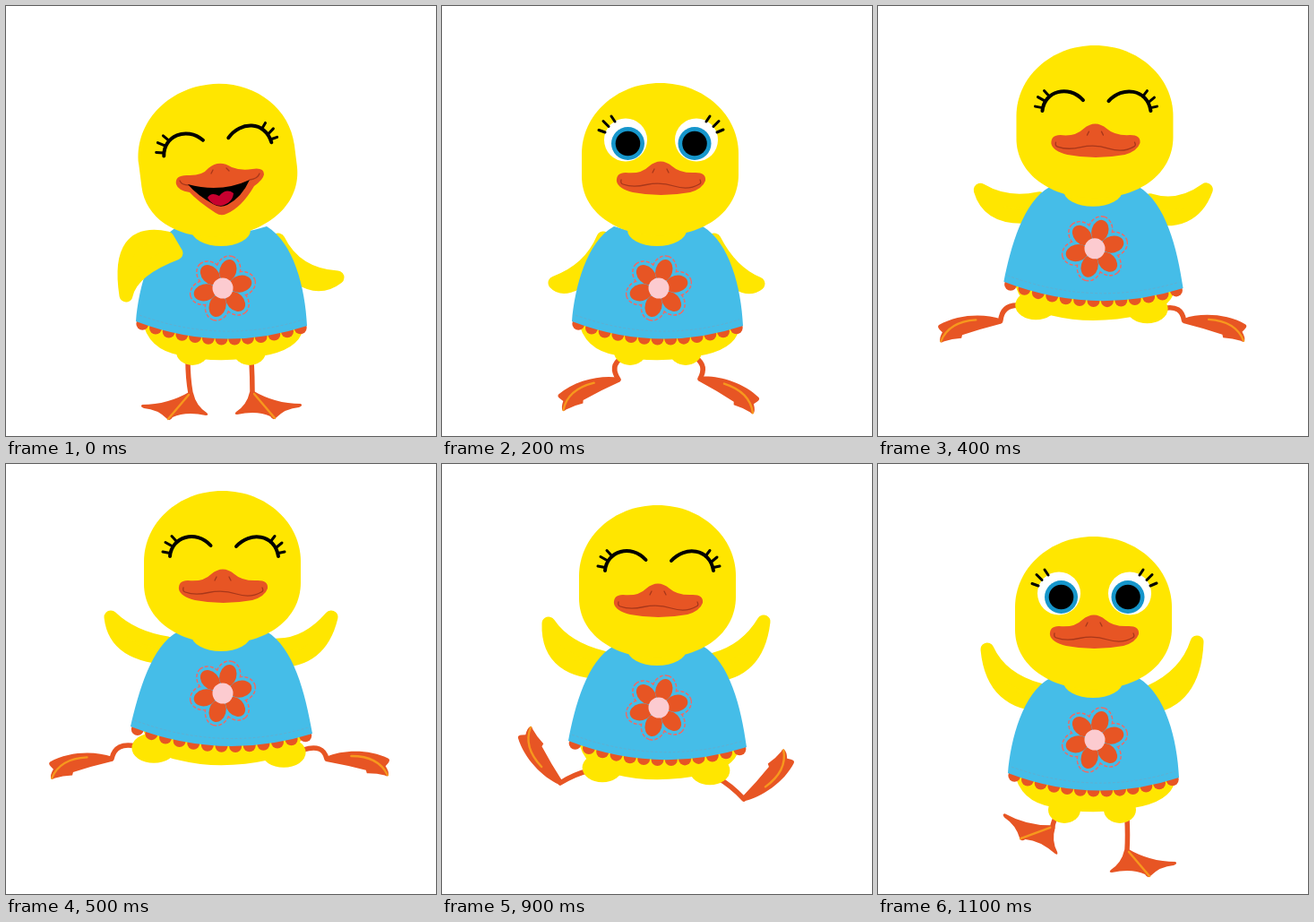
Animation of 480 by 480 pixels, one loop 1.2 s. Source, as an HTML page:

```html
<!DOCTYPE html>
<html lang="en">
<head>
<meta charset="utf-8">
<title>Jumping duckling</title>
<style>
  html, body { margin: 0; width: 100%; height: 100%; overflow: hidden; background: #fff; }
  svg { display: block; width: 100vw; height: 100vh; }
</style>
</head>
<body>
<svg id="stage" viewBox="0 0 480 480"></svg>
<script>
const YELLOW = '#ffe600', BLUE = '#45bde8', ORANGE = '#e75524', DARK = '#a8371a';
const STEP = 100, STEPS = 12;

// y: flower centre, head: [x, top, tilt], hem: extra dress width, thighs: [x, y] pairs,
// wings: upper control, tip, lower control, legs: hip, control, ankle, foot angle
const stand = {
  y: 315, hem: 0, head: [235.7, 87, -7.2], thighs: [208, 386, 272, 386],
  wingL: [122, 247, 134, 323, 140, 295], wingR: [323, 300, 370, 303, 340, 326],
  legL: [203, 396, 203, 415, 206, 432, 0], legR: [274, 396, 275, 415, 275, 431, 0],
  foot: 'web', face: 'laugh'
};
const crouch = {
  y: 315, hem: 0, head: [243.5, 86, 0], thighs: [210, 386, 272, 386],
  wingL: [165, 295, 126, 309, 142, 326], wingR: [323, 298, 353, 310, 334, 325],
  legL: [200, 393, 187, 402, 197, 417, 29], legR: [284, 393, 296, 402, 288, 416, 33],
  foot: 'side', face: 'open'
};
const leap = {
  y: 287.5, hem: 3, head: [242.5, 60, 0], thighs: [189, 353, 290, 356],
  wingL: [146, 255, 111, 244, 130, 278], wingR: [336, 255, 370, 243, 350, 278],
  legL: [174, 356, 157, 358, 158, 377, 20], legR: [306, 358, 322, 358, 323, 376, 23],
  foot: 'side', face: 'open'
};
const split = {
  y: 256, hem: 6, head: [241.5, 30, 0], thighs: [165, 317, 310, 322],
  wingL: [141, 194, 117, 171, 122, 216], wingR: [336, 202, 363, 171, 351, 221],
  legL: [145, 315, 122, 310, 118, 329, 18], legR: [332, 319, 354, 312, 358, 329, 15],
  foot: 'side', face: 'closed'
};
const peak = {
  y: 254, hem: 6, head: [241.5, 29, 0], thighs: [165, 316, 311, 321],
  wingL: [143, 190, 118, 163, 121, 213], wingR: [336, 198, 361, 163, 351, 220],
  legL: [145, 317, 125, 318, 109, 328, -67], legR: [330, 323, 350, 322, 368, 330, -62],
  foot: 'sole', face: 'closed'
};
const fall = {
  y: 272, hem: 4, head: [240.5, 46, 0], thighs: [179, 339, 299, 342],
  wingL: [138, 206, 119, 178, 117, 235], wingR: [340, 208, 359, 176, 352, 234],
  legL: [165, 342, 148, 346, 132, 356, -62], legR: [307, 350, 322, 358, 337, 374, -51],
  foot: 'sole', face: 'closed'
};
const land = {
  y: 308, hem: 0, head: [240.5, 81, 0], thighs: [208, 386, 270, 386],
  wingL: [137, 240, 122, 207, 128, 270], wingR: [344, 236, 356, 199, 353, 266],
  legL: [200, 392, 195, 400, 195, 405, -29], legR: [278, 396, 279, 415, 278, 431, 0],
  foot: 'web', face: 'open'
};

function mix(a, b, t, extra = {}) {
  const blend = (p, q) => Array.isArray(p) ? p.map((v, i) => blend(v, q[i]))
    : typeof p === 'number' ? p + (q - p) * t : p;
  const pose = {};
  for (const key in a) pose[key] = blend(a[key], b[key]);
  return { ...pose, ...extra };
}

const poses = [
  stand, mix(stand, crouch, .5, { face: 'open' }), crouch,
  leap, mix(leap, split, .53, { face: 'closed' }), split,
  mix(peak, fall, -.12), peak, mix(peak, fall, .43),
  fall, mix(fall, land, .48, { foot: 'web', face: 'open' }), land
];

const path = (d, fill, more = '') => `<path d="${d}" fill="${fill}" ${more}/>`;
const line = (d, color, width) =>
  path(d, 'none', `stroke="${color}" stroke-width="${width}" stroke-linecap="round" stroke-linejoin="round"`);
const ellipse = (x, y, rx, ry, fill, more = '') =>
  `<ellipse cx="${x}" cy="${y}" rx="${rx}" ry="${ry}" fill="${fill}" ${more}/>`;
const circle = (x, y, r, fill) => ellipse(x, y, r, r, fill);
const group = (transform, content) => `<g transform="${transform}">${content}</g>`;

const webFoot =
  path('M0-2Q25 13 54 13Q57 15 52 17Q37 18 26 29Q23 32 20 27Q5 20-17 25Q-21 25-18 22Q-6 14-3 0Z', ORANGE) +
  line('M2 2L25 29', '#f7981d', 2.4);
const sideFoot = group('scale(.95 1)',
  path('M-1-2C15-14 45-23 70-18Q73-17 71-13L69-9Q75-4 75 0Q74 2 71 1Q61 1 50 4L48 1Q25 1 0 3Z', ORANGE) +
  line('M27-10Q58-18 74 0', '#f7981d', 2.4));

function leg([hx, hy, cx, cy, ax, ay, angle], mirror, kind) {
  const foot = kind === 'web' ? webFoot : sideFoot;
  const flip = kind === 'sole' ? -1 : 1;
  return line(`M${hx} ${hy}Q${cx} ${cy} ${ax} ${ay}`, ORANGE, 5.5) +
    group(`translate(${ax} ${ay}) scale(${mirror} 1) rotate(${angle}) scale(1 ${flip})`, foot);
}

function wing([ux, uy, tx, ty, lx, ly], topX, topY, lowX, lowY) {
  return path(`M${topX} ${topY}Q${ux} ${uy} ${tx} ${ty}Q${lx} ${ly} ${lowX} ${lowY}Z`, YELLOW,
    `stroke="${YELLOW}" stroke-width="15" stroke-linejoin="round"`);
}

function flower() {
  const petals = (rx, ry, fill, more) => Array.from({ length: 6 }, (_, i) =>
    group(`translate(242 315) rotate(${-13.5 + 60 * i})`, ellipse(20.5, 0, rx, ry, fill, more))).join('');
  return petals(16.5, 13.5, 'none', 'stroke="#ee6a66" stroke-width="1.6" stroke-dasharray="4 2"') +
    petals(15.7, 12.7, BLUE) + petals(12.5, 9.4, ORANGE) + circle(242, 315, 11.5, '#fccbd0');
}

function dress(hem) {
  const left = 145 - hem, right = 336 + hem, drop = hem / 2;
  const y0 = 352, y1 = 357 + drop, dip = 388.5 + drop;
  let scallops = '';
  for (let i = 0; i < 13; i++) {
    const t = (i + .5) / 13;
    const x = left + (right - left) * t;
    const y = (1 - t) ** 2 * y0 + 2 * t * (1 - t) * dip + t * t * y1;
    scallops += circle(x, y, 7, ORANGE);
  }
  return scallops +
    path(`M192 246C162 262 148 314 ${left} ${y0}Q241 ${dip} ${right} ${y1}C334 314 321 264 291 246Q241 262 192 246Z`, BLUE) +
    path(`M${left + 4} ${y0 - 7}Q241 ${dip - 10} ${right - 4} ${y1 - 7}`, 'none',
      'stroke="#7f9fb8" stroke-width=".8" stroke-dasharray="3 2" opacity=".6"') +
    flower();
}

const openEyes =
  circle(205, 149.5, 24, '#fff') + circle(207.5, 153.5, 18.5, '#1696cb') + circle(207.5, 153.5, 13.8, '#000') +
  circle(284, 149.5, 24, '#fff') + circle(282, 153.5, 18.5, '#1696cb') + circle(282, 153.5, 13.8, '#000') +
  line('M175 138.500L182 141M180 128.500L186 134.500M189 123L193 129M295 129L299 123M303 134.500L309 128.500M307 141L314 138', '#000', 3);
const closedEyes =
  line('M185 159C187 137 214 129 230.500 147M259 148C274 131 302 134 306 159', '#000', 4) +
  line('M177 154L185 155.500M180 143.500L188 148M187 136.500L192 142M297 143L302 136.500M304 149L310 144M306 155.500L313 154', '#000', 3);
const beak =
  path('M195 196Q194 186 205 186Q222 188 231 179Q244 168 257 179Q266 187 283 186Q295 186 294 195Q291 204 277 208Q244 214 213 208Q197 204 195 196Z', ORANGE) +
  line('M235 186L237 182M251 182L253 186M200 194Q199 198 202 199Q213 203 228 199.500Q244 196 259 201Q275 206 287 199Q290 198 288 194', DARK, 1.3);
const laugh =
  path('M190 199Q188 189 202 189Q219 190 226 181Q238 171 252 180Q262 184 275 182Q288 180 288 188Q287 194 277 201Q263 225 246 232Q240 235 234 231Q214 218 205 208Q192 206 190 199Z', ORANGE) +
  line('M194 195Q196 200 204 200M272 194Q281 193 283 187M229 187L231 183M246 181L249 184', DARK, 1.3) +
  path('M203 199Q240 209 272 194Q263 214 247 222Q239 226 231 221Q213 211 203 199Z', '#000') +
  path('M225 214Q229 207 238 212Q246 203 254 209Q253 220 240 223Q230 223 225 214Z', '#c8002f');
const skull =
  path('M243.500 86C194 86 156 122 156 165V190C156 230 195 256.500 243.500 256.500S331 230 331 188V165C331 122 293 86 243.500 86Z', YELLOW);

function duck(p) {
  const thighWidth = 18 + p.hem * 1.1, thighHeight = 15 + p.hem * .3;
  const [lx, ly, rx, ry] = p.thighs;
  const [headX, headTop, tilt] = p.head;
  const shift = `translate(0 ${p.y - 315})`;
  const laughing = p.face === 'laugh';
  const leftWing = wing(p.wingL, 180, p.y - 56, 190, p.y - 39);
  return leg(p.legL, -1, p.foot) + leg(p.legR, 1, p.foot) +
    (laughing ? '' : leftWing) + wing(p.wingR, 304, p.y - 54, 300, p.y - 36) +
    group(shift, path('M152 350Q158 384 195 390Q240 401 295 389Q332 380 332 355Z', YELLOW)) +
    ellipse(lx, ly, thighWidth, thighHeight, YELLOW) + ellipse(rx, ry, thighWidth, thighHeight, YELLOW) +
    group(shift, dress(p.hem) + ellipse(240, 250, 33, 18, YELLOW)) +
    (laughing ? leftWing : '') +
    group(`translate(${headX} ${headTop + 84}) rotate(${tilt}) translate(-243.500 -170)`,
      skull + (p.face === 'open' ? openEyes : closedEyes) + (laughing ? '' : beak)) +
    (laughing ? laugh : '');
}

const stage = document.getElementById('stage');
const start = performance.now();
let shown = -1;

function update(now) {
  const step = Math.floor(Math.max(0, now - start) / STEP) % STEPS;
  if (step !== shown) {
    stage.innerHTML = duck(poses[step]);
    shown = step;
  }
  requestAnimationFrame(update);
}
update(start);
</script>
</body>
</html>
```
